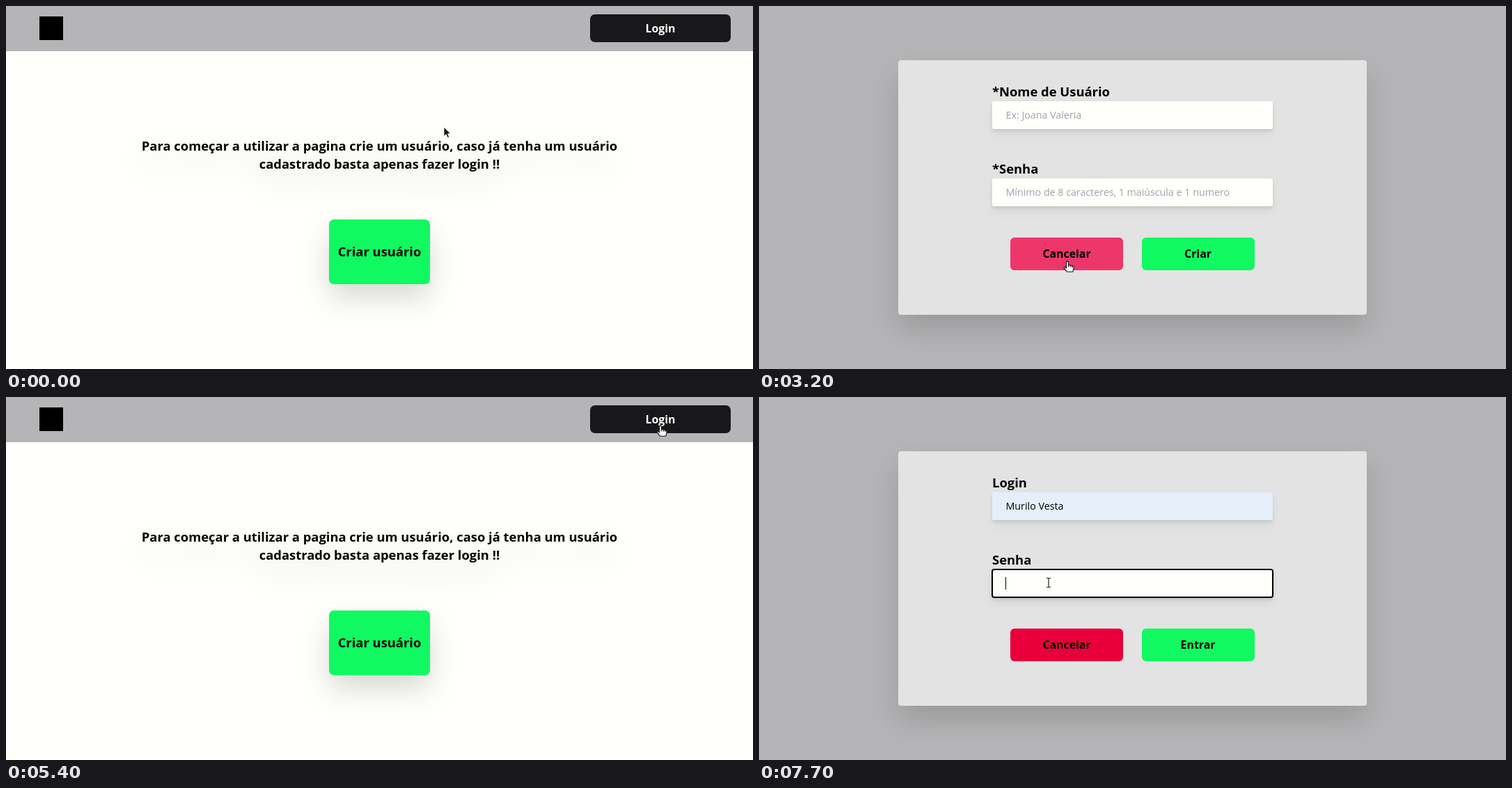
These frames come from a looping animation (1073 by 522 pixels, 8000 ms). An HTML page:

```html
<!DOCTYPE html>
<html lang="pt-BR">
<head>
<meta charset="utf-8">
<title>Criar usuário e login</title>
<style>
  html, body { margin: 0; width: 100%; height: 100%; overflow: hidden; }
  #stage {
    position: relative; width: 1073px; height: 522px; overflow: hidden;
    background: #b5b5b7; color: #000; white-space: nowrap;
    font: 14.25px "Open Sans", "Noto Sans", sans-serif;
  }
  #stage *, #stage *::before { position: absolute; box-sizing: border-box; }
  #stage br { position: static; }
  .scene { inset: 0; visibility: hidden; }
  .scene.on { visibility: visible; }

  .home { background: #fffffc; }
  .bar { width: 1073px; height: 65px; background: #b5b5b7; }
  .mark { left: 48px; top: 15px; width: 34px; height: 34px; background: #000; }
  .enter {
    left: 839px; top: 12px; width: 202px; height: 40px; border-radius: 7px;
    background: #18181a; color: #fff; text-align: center; font: 700 15.85px/40px "Open Sans", sans-serif;
  }
  .intro {
    margin: 0; left: 0; width: 1073px; top: 188px; text-align: center;
    font: 700 18.4px/26.4px "Open Sans", sans-serif;
    filter: drop-shadow(0 20px 20px rgb(0 0 0 / .15));
  }
  .new {
    left: 464px; top: 307px; width: 145px; height: 93px; border-radius: 7px;
    background: #11f960; text-align: center; font: 700 18.4px/92px "Open Sans", sans-serif;
    filter: drop-shadow(0 20px 20px rgb(0 0 0 / .15));
  }
  .new.hover { background: #16ff86; }

  .panel {
    left: 200px; top: 78px; width: 673px; height: 366px; border-radius: 4px;
    background: #e3e3e3; filter: drop-shadow(0 20px 20px rgb(0 0 0 / .15));
  }
  .label { left: 335px; font: 700 18.4px/26px "Open Sans", sans-serif; }
  .field {
    left: 335px; width: 403px; height: 40px; padding-left: 19.5px; border-radius: 3px;
    background: #fffffc; line-height: 39px;
    filter: drop-shadow(0 8px 7px rgb(0 0 0 / .04)) drop-shadow(0 3px 2.5px rgb(0 0 0 / .1));
  }
  .field.hint { color: #9ca3af; }
  .field.focus { outline: 2px solid #000; outline-offset: -1px; }
  .field.caret::before { content: ""; left: 19px; top: 11px; width: 1px; height: 18px; background: #000; }
  .field.filled { background: #e6eefa; }
  .top.label { top: 110px; } .low.label { top: 221px; }
  .top.field { top: 137px; } .low.field { top: 248px; }
  .button {
    top: 333px; width: 162px; height: 47px; border-radius: 6px;
    text-align: center; font: 700 15.85px/47px "Open Sans", sans-serif;
  }
  .cancel { left: 361px; background: #e9003a; }
  .cancel.hover { background: #ed366a; }
  .confirm { left: 549.5px; background: #11f960; }

  .list {
    left: 416px; top: 184px; width: 187px; height: 184px; padding: 0; margin: 0; border-radius: 3px;
    background: #fffffd; list-style: none; font-size: 12.5px; color: #222;
    box-shadow: 0 1px 3px rgb(0 0 0 / .35); visibility: hidden;
  }
  .list.on { visibility: visible; }
  .list::before {
    content: ""; left: 9px; top: -7px; border: solid transparent;
    border-width: 0 8px 7px; border-bottom-color: #fffffd;
  }
  .list li { left: 0; width: 187px; height: 29.65px; padding-left: 9.5px; line-height: 29.65px; }
  .list li.hover { background: #ececec; }

  #cursor { left: 0; top: 0; width: 1px; height: 1px; overflow: visible; }
  #cursor path { visibility: hidden; stroke-linejoin: round; }
  #cursor path.on { visibility: visible; }
</style>
</head>
<body>
<div id="stage">
  <section class="scene home">
    <div class="bar"></div>
    <div class="mark"></div>
    <div class="enter">Login</div>
    <p class="intro">Para começar a utilizar a pagina crie um usuário, caso já tenha um usuário<br>cadastrado basta apenas fazer login !!</p>
    <div class="new">Criar usuário</div>
  </section>
  <section class="scene create">
    <div class="panel"></div>
    <div class="top label">*Nome de Usuário</div>
    <div class="top field hint">Ex: Joana Valeria</div>
    <div class="low label">*Senha</div>
    <div class="low field hint">Mínimo de 8 caracteres, 1 maiúscula e 1 numero</div>
    <div class="button cancel">Cancelar</div>
    <div class="button confirm">Criar</div>
  </section>
  <section class="scene login">
    <div class="panel"></div>
    <div class="top label">Login</div>
    <div class="top field"></div>
    <div class="low label">Senha</div>
    <div class="low field"></div>
    <div class="button cancel">Cancelar</div>
    <div class="button confirm">Entrar</div>
    <ul class="list"></ul>
  </section>
  <svg id="cursor">
    <path id="arrow" d="M0 0V13.5L3.2 10.6 5.4 15.4 7.7 14.4 5.6 9.8H9.6Z" fill="#111" stroke="#fff" stroke-width=".9"/>
    <path id="hand" d="M-1.5 1.3Q0-1 1.4 1.3V6Q3 4.8 4.2 6.3 5.8 5.4 6.8 7 8.8 6.4 9 8.4V11.5L7.6 15.2H-.7L-4.4 10.2Q-5.6 7.8-3.4 8.2L-1.5 10ZM1.4 6V8.5M4.2 6.3V8.7M6.8 7V9" fill="#fff" stroke="#111" stroke-width="1.1"/>
    <path id="beam" d="M-3-6.5H-1Q0-6.5 0-5.5Q0-6.5 1-6.5H3M0-5.5V5.5M-3 6.5H-1Q0 6.5 0 5.5Q0 6.5 1 6.5H3" fill="none" stroke="#222" stroke-width="1.2"/>
  </svg>
</div>
<script>
const LOOP = 8000, STEP = 100;
const USERS = ["Murilo Vesta", "Elias Dorva", "Livia Tarnos", "norbeli.t27@example.com",
  "Sergio Valtera", "Valdirson Otavio Norel"];

// Pointer path: time, x, y
const PATH = [
  [200, 629, 174], [1100, 537, 368], [1200, 537, 368], [1400, 537, 360], [2400, 537, 360],
  [2700, 490, 245], [3000, 441, 365], [3100, 441, 365], [3200, 443, 367], [3300, 443, 367],
  [3600, 443, 332], [3700, 443, 332], [3900, 447, 172], [4000, 447, 172], [4400, 413, 362],
  [4700, 413, 362], [4800, 440, 365], [4900, 455, 345], [5000, 632, 307], [5100, 632, 307],
  [5400, 940, 41], [5600, 940, 41], [6300, 461, 172], [6400, 461, 172], [6500, 461, 161],
  [6600, 461, 163], [6700, 461, 163], [6900, 450, 200], [7200, 446, 204], [7600, 416, 270],
  [7700, 416, 267]
];

const $ = selector => document.querySelector(selector);
const toggle = (el, name, on) => el.classList.toggle(name, on);
const scenes = { home: $(".home"), create: $(".create"), login: $(".login") };
const stage = $("#stage"), list = $(".list"), cursor = $("#cursor");
const user = $(".login .top.field"), password = $(".login .low.field");

const rows = USERS.map((name, i) => {
  const row = document.createElement("li");
  row.textContent = name;
  row.style.top = 3 + i * 29.65 + "px";
  list.append(row);
  return row;
});

function pointerAt(t) {
  const next = PATH.findIndex(key => key[0] >= t);
  if (next === 0) return PATH[0].slice(1);
  if (next < 0) return PATH.at(-1).slice(1);
  const [t0, x0, y0] = PATH[next - 1], [t1, x1, y1] = PATH[next];
  const k = (t - t0) / (t1 - t0);
  return [x0 + (x1 - x0) * k, y0 + (y1 - y0) * k];
}

function sceneAt(t) {
  if (t >= 5500) return "login";
  return t >= 1800 && t < 4600 ? "create" : "home";
}

function render(now) {
  const t = Math.floor(now % LOOP / STEP) * STEP;
  const [x, y] = pointerAt(t);
  const scene = sceneAt(t);
  const origin = stage.getBoundingClientRect();
  const over = el => {
    const box = el.getBoundingClientRect();
    const px = x + origin.left, py = y + origin.top;
    return px >= box.left && px < box.right && py >= box.top && py < box.bottom;
  };

  for (const name in scenes) toggle(scenes[name], "on", name === scene);

  const listOpen = t >= 6500 && t < 7200;
  const filled = t >= 6900;
  const onPassword = t >= 7700;
  toggle(list, "on", listOpen);
  rows.forEach(row => toggle(row, "hover", listOpen && over(row)));
  user.textContent = filled ? USERS[0] : "";
  toggle(user, "filled", filled);
  toggle(user, "focus", t >= 6500 && !onPassword);
  toggle(user, "caret", t >= 6500 && !filled);
  toggle(password, "focus", onPassword);
  toggle(password, "caret", onPassword);

  let shape = "arrow";
  const covered = listOpen && over(list);
  for (const el of scenes[scene].querySelectorAll(".new, .enter, .button, .field")) {
    const hit = !covered && over(el);
    const isField = el.matches(".field");
    if (!isField) toggle(el, "hover", hit);
    if (hit) shape = isField ? "beam" : "hand";
  }
  for (const path of cursor.children) toggle(path, "on", path.id === shape);
  cursor.style.transform = `translate(${x}px, ${y}px)`;
  requestAnimationFrame(render);
}
requestAnimationFrame(render);
</script>
</body>
</html>
```
